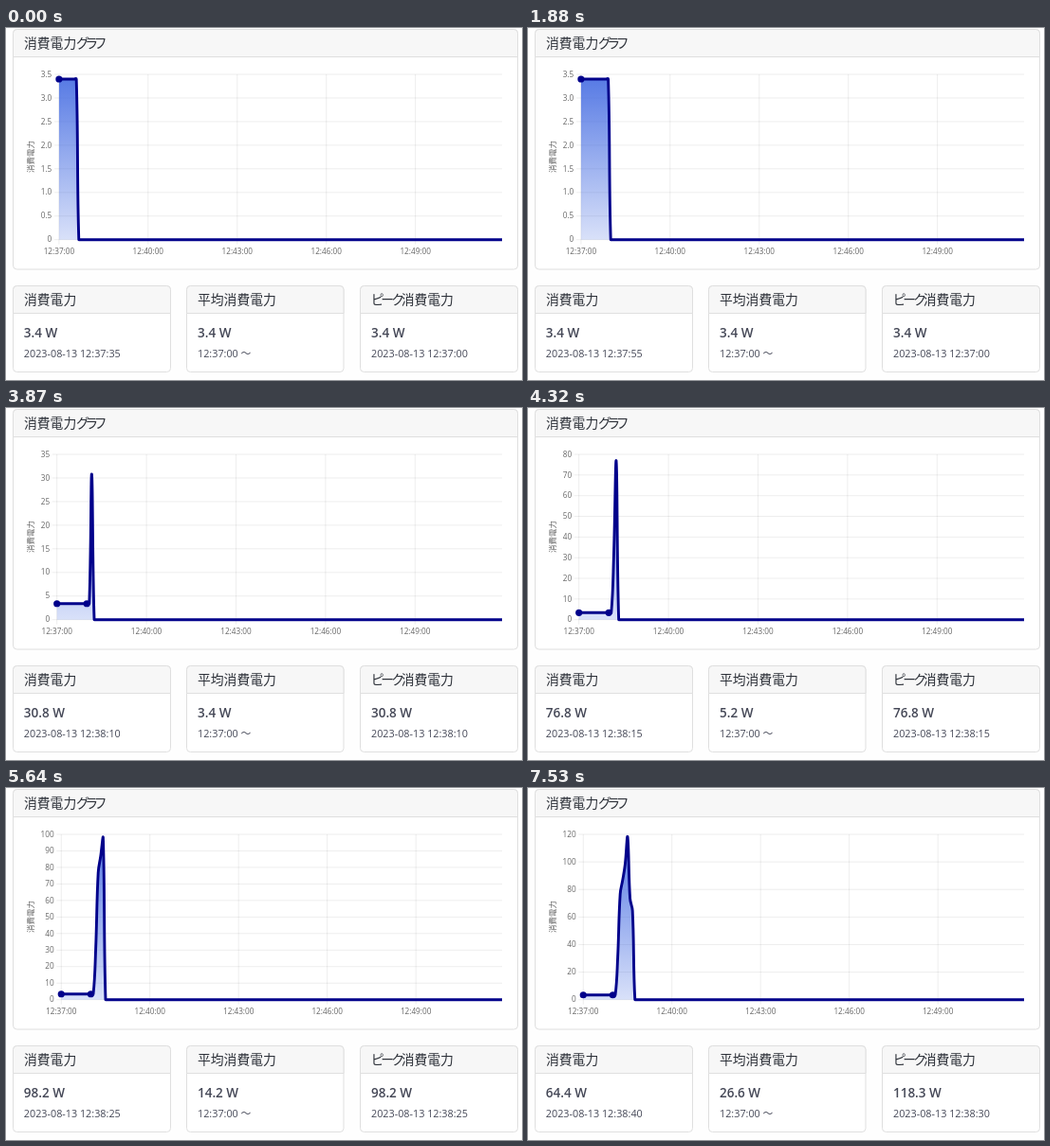
An HTML page for the animation above (8000 ms loop, 544 by 372 pixels).

```html
<!DOCTYPE html>
<html lang="ja">
<head>
<meta charset="utf-8">
<style>
  html, body { margin: 0; height: 100%; overflow: hidden; background: #fefefe; }
  svg { display: block; }
  text { font-family: "Open Sans", "Noto Sans CJK JP", sans-serif; fill: #454857; }
  .title { font: 500 13.8px "Noto Sans CJK JP", sans-serif; fill: #2c3038; }
  .kana { font-feature-settings: "palt"; letter-spacing: -2.4px; }
  .value { font-size: 13.5px; font-weight: 600; }
  .note { font-size: 10.8px; }
  .axis { font-size: 8.2px; fill: #666; }
  .card { fill: #fff; stroke: #dfdfdf; }
  .head { fill: #f7f7f7; stroke: #dfdfdf; }
  .grid { stroke: #000; stroke-opacity: .07; fill: none; }
  .line { stroke: #00008b; stroke-width: 2.9; stroke-linejoin: round; fill: none; }
  .dot { fill: #00008b; }
</style>
</head>
<body>
<svg id="stage" width="544" height="372" viewBox="0 0 544 372">
  <defs>
    <linearGradient id="fade" gradientUnits="userSpaceOnUse" x1="0" y1="49" x2="0" y2="223.7">
      <stop offset="0" stop-color="#4169e1" stop-opacity=".9"/>
      <stop offset="1" stop-color="#4169e1" stop-opacity=".2"/>
    </linearGradient>
  </defs>
  <g id="cards"></g>
  <g id="chart"></g>
  <g id="readings"></g>
</svg>
<script>
const LOOP = 8000;
const TOP = 49, BOTTOM = 223.7, RIGHT = 523;
const POINTS = 180, SECONDS = 5, TENSION = 0.4;
const IDLE = 3.4, IDLE_COUNT = 14;
const surge = [30.8, 76.8, 86.8, 98.2, 118.3, 73.5, 64.4];
const samples = [...Array(IDLE_COUNT).fill(IDLE), ...surge];
const FIRST_COUNT = 8;
const updates = [0, 110, 660, 1320, 1880, 2540, 3210, 3870, 4320, 4980, 5640, 6310, 6970, 7530];

const byId = id => document.getElementById(id);
const clamp = y => Math.min(BOTTOM, Math.max(TOP, y));
const text = (x, y, cls, content, extra = '') =>
  `<text x="${x}" y="${y}" class="${cls}" ${extra}>${content}</text>`;
const clock = index => {
  const s = 37 * 60 + index * SECONDS;
  return `12:${Math.floor(s / 60)}:${String(s % 60).padStart(2, '0')}`;
};

function card(x, y, w, h, title) {
  const r = 4;
  return `<rect class="card" x="${x}" y="${y}" width="${w}" height="${h}" rx="${r}"/>
    <path class="head" d="M${x} ${y + 29}v${r - 29}q0 ${-r} ${r} ${-r}h${w - 2 * r}q${r} 0 ${r} ${r}v${29 - r}z"/>` +
    text(x + 11.5, y + 19.3, 'title', title);
}

// Rounds a rough step up to 1, 2, 5 or 10 times a power of ten.
function niceStep(rough) {
  const power = 10 ** Math.floor(Math.log10(rough));
  return [1, 2, 5, 10].find(n => rough / power <= n) * power;
}

// Control points before and after b, sized by the distance to each neighbour.
function controls(a, b, c) {
  const before = Math.hypot(b.x - a.x, b.y - a.y);
  const after = Math.hypot(c.x - b.x, c.y - b.y);
  const scale = TENSION / (before + after);
  const at = k => `${b.x + k * (c.x - a.x)} ${clamp(b.y + k * (c.y - a.y))}`;
  return { before: at(-scale * before), after: at(scale * after) };
}

function curve(pts) {
  const handles = pts.map((p, i) => controls(pts[i - 1] || p, p, pts[i + 1] || p));
  return pts.map((p, i) => i
    ? `C${handles[i - 1].after} ${handles[i].before} ${p.x} ${p.y}`
    : `M${p.x} ${p.y}`).join('');
}

function chart(data, peak) {
  const step = niceStep(peak / 10);
  const ticks = Math.ceil(peak / step);
  const max = ticks * step;
  const label = v => v && step < 1 ? v.toFixed(1) : String(Math.round(v));
  const widest = label(max);
  const left = 44.6 + (widest.includes('.') ? 11.3 : widest.length * 4.55);
  const xAt = i => left + i * (RIGHT - left) / (POINTS - 1);
  const yAt = v => BOTTOM - v / max * (BOTTOM - TOP);

  let grid = '', labels = '';
  for (let i = 0; i <= ticks; i++) {
    const y = yAt(i * step);
    grid += `M${left - 5} ${y}H${RIGHT}`;
    labels += text(left - 7.6, y + 2.7, 'axis', label(i * step), 'text-anchor="end"');
  }
  for (let i = 0; i < POINTS; i += 36) {
    grid += `M${xAt(i)} ${TOP}V${BOTTOM + 5}`;
    labels += text(xAt(i), 238.7, 'axis', clock(i), 'text-anchor="middle"');
  }

  const pts = Array.from({ length: POINTS }, (_, i) => ({ x: xAt(i), y: yAt(data[i] || 0) }));
  const path = curve(pts);
  const dots = [0, 12].filter(i => i < data.length)
    .map(i => `<circle class="dot" cx="${pts[i].x}" cy="${pts[i].y}" r="3.6"/>`).join('');
  return `<path class="grid" d="${grid}"/>${labels}
    <path fill="url(#fade)" d="${path}V${BOTTOM}H${left}z"/>
    <path class="line" d="${path}"/>${dots}`;
}

function readings(data, peak) {
  const last = data.length - 1;
  const mean = data.slice(0, last).reduce((a, b) => a + b) / last;
  const stamp = i => '2023-08-13 ' + clock(i);
  const block = (x, watts, note) =>
    text(x, 326.8, 'value', watts.toFixed(1) + ' W') + text(x, 348, 'note', note);
  return block(18.8, data[last], stamp(last)) +
    block(202, mean, clock(0) + ' ～') +
    block(385, peak, stamp(data.indexOf(peak)));
}

const kana = s => `<tspan class="kana">${s}</tspan>`;
byId('cards').innerHTML =
  card(7.5, 1.5, 532, 253.5, '消費電力' + kana('グラフ')) +
  card(7.5, 272.5, 166, 91, '消費電力') +
  card(190.5, 272.5, 165.5, 91, '平均消費電力') +
  card(373.5, 272.5, 166, 91, kana('ピーク') + '消費電力') +
  text(0, 0, 'axis', '消費電力',
    'text-anchor="middle" style="font-size:8.5px" transform="translate(29.3 136) rotate(-90)"');

let shown = -1;
function frame() {
  const time = performance.now() % LOOP;
  const state = updates.filter(t => t <= time).length - 1;
  if (state !== shown) {
    shown = state;
    const data = samples.slice(0, FIRST_COUNT + state);
    const peak = Math.max(...data);
    byId('chart').innerHTML = chart(data, peak);
    byId('readings').innerHTML = readings(data, peak);
  }
  requestAnimationFrame(frame);
}
frame();
</script>
</body>
</html>
```
